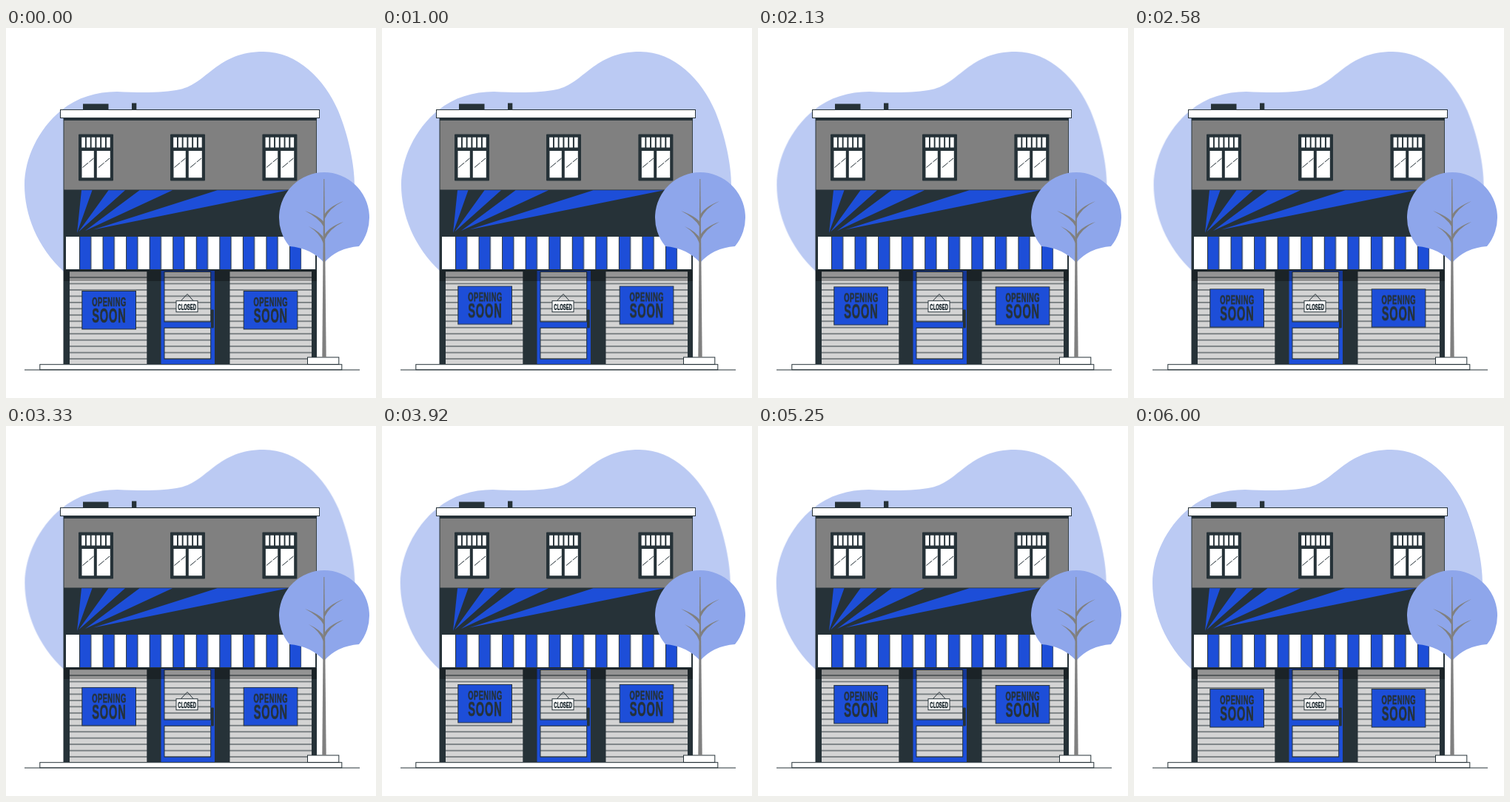
Recreate the animation shown at these times as an HTML page without scripts. Size 500 by 500 pixels, loop 6040 ms.

```html
<!DOCTYPE html>
<html lang="en">
<head>
<meta charset="utf-8">
<title>Opening soon</title>
<style>
  :root { --blue: #1d4ed8; --dark: #263238; --grey: #808080; }
  html, body { margin: 0; width: 100%; height: 100%; overflow: hidden; background: #fff; }
  svg { display: block; width: 100%; height: 100%; }
  .dark { fill: var(--dark); }
  .blue { fill: var(--blue); }
  .grey { fill: var(--grey); }
  .line { stroke: var(--dark); stroke-width: 1; }
  .white { fill: #fff; }
  text { font-family: "Liberation Sans", Arial, sans-serif; font-weight: 700; text-anchor: middle; fill: var(--dark); }
  .bold { stroke: var(--dark); stroke-width: .6; }

  /* 6 s of motion, then a 40 ms hold */
  .blob { fill: #bbcaf3; animation: shake 6.04s linear infinite; }
  .sign { animation: float 6.04s linear infinite; }
  @keyframes shake {
    0%, 99.338%, 100% { transform: translateX(0); }
    9.934%, 89.404% { transform: translateX(-1px); }
    19.868%, 79.47% { transform: translateX(2px); }
    29.801%, 49.669%, 69.536% { transform: translateX(-4px); }
    39.735%, 59.603% { transform: translateX(4px); }
  }
  @keyframes float {
    0%, 49.669%, 99.338%, 100% { transform: translateY(0); }
    24.834%, 74.503% { transform: translateY(-10px); }
  }
</style>
</head>
<body>
<svg viewBox="0 0 500 500">
  <defs>
    <pattern id="slats" y="328.53" width="10" height="8.47" patternUnits="userSpaceOnUse">
      <rect width="10" height="8.47" fill="#d4d4d4"/>
      <rect class="dark" y="7.97" width="10" height=".5"/>
      <rect class="dark" width="10" height=".5"/>
    </pattern>
    <pattern id="stripes" x="99" width="31.55" height="50" patternUnits="userSpaceOnUse">
      <rect class="white" width="31.55" height="50"/>
      <rect class="blue" width="15.8" height="50"/>
      <path class="line" d="M.5 0V50M15.8 0V50"/>
    </pattern>
    <g id="window">
      <rect class="dark" x="98" y="143.5" width="47" height="63" rx="1"/>
      <path d="M104.6 147.7V161.6M111.3 147.7V161.6M118 147.7V161.6M124.8 147.7V161.6M131.5 147.7V161.6M138.3 147.7V161.6" stroke="#fff" stroke-width="4.8"/>
      <path class="white" d="M102.5 166H118.8V202.3H102.5ZM122.8 166H140.8V202.3H122.8Z"/>
      <path class="line" d="M103.5 188.5L118.5 176M125 188.5L140 176" stroke-dasharray="10 1.5"/>
    </g>
    <g id="notice">
      <rect class="blue line" x="102.8" y="355.5" width="72.7" height="51.5"/>
      <g class="bold" transform="translate(139.4) scale(.54 1)">
        <text y="375.6" font-size="17.3" letter-spacing=".9">OPENING</text>
        <text y="398.3" font-size="27" letter-spacing="1.5">SOON</text>
      </g>
    </g>
  </defs>

  <path class="blob" d="M25 212C25 177 43 137 75 111C96 94 122 86 150 86C190 88 215 87 235 83C272 75 285 32 348 32C394 32 431 70 449 112C463 146 471 185 471 213C471 255 455 285 410 290L300 380H150C115 355 94 344 78 329C42 296 25 252 25 212Z"/>

  <!-- Upper floor -->
  <path class="dark" d="M104 102.5H138.5V111H104ZM170 101.5H176.3V111H170Z"/>
  <rect class="dark" x="77.5" y="121" width="342.5" height="333.5"/>
  <rect class="grey" x="78.5" y="125" width="340.7" height="93.5"/>
  <rect class="white line" x="73.5" y="110.5" width="350" height="11"/>
  <use href="#window"/>
  <use href="#window" x="124"/>
  <use href="#window" x="248.4"/>

  <!-- Fascia and awning -->
  <path class="blue" d="M102 219.3H116.5L96 277ZM138.5 219.3H161L98 275.5ZM180.5 219.3H225L107 274ZM285.5 219.3H381L118 272.5Z"/>
  <rect class="white line" x="80.5" y="281.5" width="338" height="45"/>
  <rect x="99" y="282" width="300.2" height="44" fill="url(#stripes)"/>

  <!-- Ground floor -->
  <rect x="86" y="329" width="104.3" height="125.3" fill="url(#slats)"/>
  <rect x="302.5" y="329" width="110.5" height="125.3" fill="url(#slats)"/>
  <rect class="blue" x="209.5" y="328" width="72.5" height="126.5"/>
  <g class="line" fill="url(#slats)">
    <rect x="214" y="329.5" width="62.7" height="67.5"/>
    <rect x="214" y="405.2" width="62.7" height="42"/>
  </g>
  <rect class="dark" x="277" y="380.5" width="3.8" height="25" rx="1"/>
  <rect x="78" y="327" width="342" height="15" opacity=".3"/>

  <path class="line" d="M236 369L245 359.5L253.5 369" fill="none"/>
  <rect class="white line" x="230" y="368.7" width="29" height="15"/>
  <text class="bold" transform="translate(244.7 380.6) scale(.54 1)" font-size="11">CLOSED</text>

  <g class="sign">
    <use href="#notice"/>
    <use href="#notice" x="218.4"/>
  </g>

  <!-- Pavement -->
  <path class="line" d="M25 462H478"/>
  <rect class="white line" x="45.8" y="454.7" width="408" height="7"/>
  <rect class="white line" x="407.5" y="445" width="42.3" height="9.5"/>

  <!-- Tree -->
  <path fill="#8ea6eb" d="M383 295A61 61 0 1 1 477 295Q448 297 430 317Q411 297 383 295Z"/>
  <g class="grey">
    <path d="M429.3 204L427.3 445H432.7L430.3 204Z"/>
    <path d="M429 268Q423 257 404 247Q425 255 430 263Z"/>
    <path d="M430 259Q437 243 456 234Q435 242 429 254Z"/>
    <path d="M429 291Q424 277 409 268Q426 276 430 285Z"/>
    <path d="M430 287Q437 271 456 262Q435 269 429 282Z"/>
  </g>
</svg>
</body>
</html>
```
